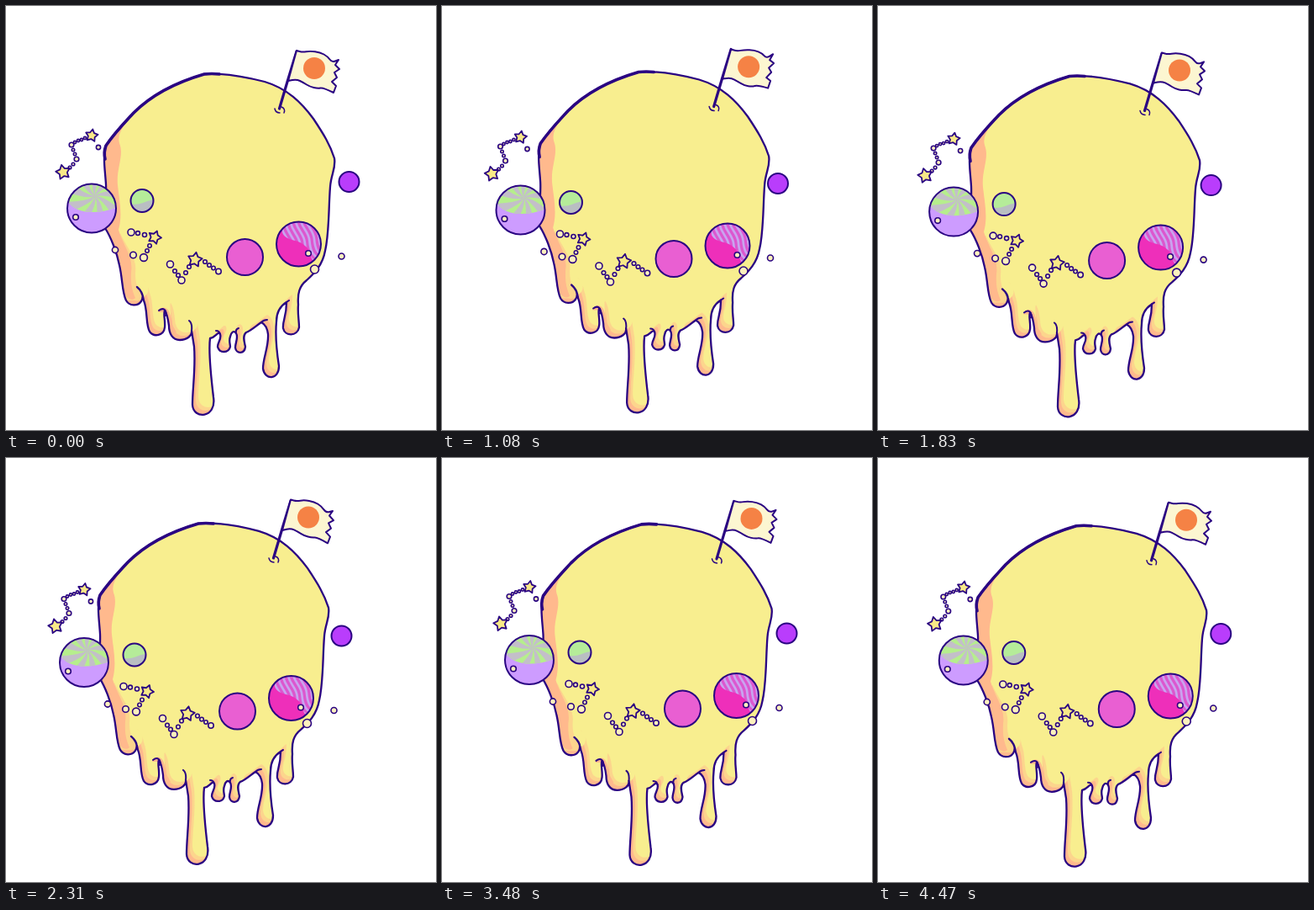
Write an HTML page that moves like this. It is 512 px wide and 504 px high and loops after 4500 ms.

```html
<!DOCTYPE html>
<html lang="en">
<head>
<meta charset="utf-8">
<title>Melting planet</title>
<style>
  html, body { margin: 0; width: 100%; height: 100%; overflow: hidden; background: #fff; }
  svg { display: block; width: 100vw; height: 100vh; }
  .ink { stroke: #2a0482; stroke-width: 2; stroke-linejoin: round; stroke-linecap: round; }
  .line { fill: none; }
</style>
</head>
<body>
<svg viewBox="0 0 512 504">
  <defs>
    <path id="shape"/>
    <clipPath id="inBody"><use href="#shape"/></clipPath>
    <clipPath id="inMint"><circle cx="102" cy="240.5" r="29"/></clipPath>
    <clipPath id="inCap"><path d="M73 231C82 247 108 249 132 239V208H72Z"/></clipPath>
    <clipPath id="inSmall"><circle cx="162" cy="231.5" r="13.5"/></clipPath>
    <clipPath id="inRose"><circle cx="348.5" cy="283" r="26.5"/></clipPath>
    <clipPath id="inStripes"><path d="M329 255V270C336 281 347 276 356 285C365 291 359 301 371 306H380V250Z"/></clipPath>
  </defs>

  <g id="body">
    <g clip-path="url(#inBody)">
      <use href="#shape" fill="#ffb98d"/>
      <use href="#shape" fill="#fcd58d" x="4" y="-5"/>
      <use href="#shape" fill="#f8ee8f" x="7" y="-9"/>
      <path fill="#fcd58d" d="M136 270C144 288 157 300 154 318C154 335 160 340 166 350H140L125 290Z"/>
      <path fill="#ffb98d" d="M156 122C146 136 131 149 135 163C141 178 131 193 133 213C135 232 139 248 134 266C139 284 152 298 149 316C148 332 151 340 154 347C150 351 146 348 143 345L105 280V160Z"/>
      <path fill="#ffb98d" d="M181 364C186 354 195 359 196 370C197 380 201 383 203 388L192 390L188 364Z"/>
    </g>
    <use href="#shape" class="ink line" style="stroke-width:2.3"/>
    <path class="ink line" style="stroke-width:3.6" d="M118 182Q116 174 119 166C130 150 140 140 152 127C175 104 205 90 236 81Q245 80 254 81"/>
    <path class="ink line" d="M334 352L337 350M304 376Q307 373 311 373M274 389Q273 384 277 383M255 390Q254 386 250 386M221 386Q222 377 218 374M190 368C192 361 187 358 182 362"/>
    <path class="ink line" style="stroke-width:1.5" d="M320 122Q321 127 326 127M328 120Q333 122 331 127"/>
    <path class="ink line" style="stroke-width:3.2" d="M325.5 122L335 90L346 54"/>
    <path id="flag" class="ink" fill="#fcf6d1"/>
    <circle id="badge" cx="367" cy="74" r="13" fill="#f58245"/>
  </g>

  <g id="orbit">
    <g clip-path="url(#inMint)">
      <circle cx="102" cy="240.5" r="29" fill="#cd9cff"/>
      <g clip-path="url(#inCap)">
        <rect x="70" y="205" width="65" height="45" fill="#b6ee8d"/>
        <path id="swirl" fill="#c3bfc9"/>
      </g>
    </g>
    <circle class="ink line" cx="102" cy="240.5" r="29"/>
    <g clip-path="url(#inSmall)">
      <circle cx="162" cy="231.5" r="13.5" fill="#b9bec2"/>
      <path fill="#b5ec99" d="M147 216H177V230Q169 231 163 234Q156 237 147 235Z"/>
    </g>
    <circle class="ink line" cx="162" cy="231.5" r="13.5"/>
    <circle class="ink" cx="284.5" cy="298.5" r="21.5" fill="#e95fd2"/>
    <g clip-path="url(#inRose)">
      <circle cx="348.5" cy="283" r="26.5" fill="#ee2fba"/>
      <g clip-path="url(#inStripes)">
        <rect x="325" y="252" width="55" height="56" fill="#dc57cf"/>
        <path id="stripes" fill="none" stroke="#c9a4ef" stroke-width="2.7"/>
      </g>
    </g>
    <circle class="ink line" cx="348.5" cy="283" r="26.5"/>
    <circle class="ink" cx="408.5" cy="209" r="12" fill="#b93dfc"/>
    <g id="dots" class="ink" fill="#fdf1bd" style="stroke-width:1.6"></g>
    <path id="stars" class="ink" fill="#f8e987" style="stroke-width:1.8"/>
  </g>
</svg>
<script>
const LOOP = 4500, STEP = 30;
const $ = id => document.getElementById(id);

const dome = `M156 334C163 340 164 346 161 351C157 357 147 357 143 350
  C138 340 139 325 135 308C132 293 125 275 118 264C115 250 120 235 119 212
  C118 195 115 180 119 166C130 150 140 140 152 127C175 104 205 90 236 81
  C260 79 285 84 308 90C335 98 352 115 366 134C378 152 386 165 391 181
  C393 193 387 200 386 215C384 240 385 270 380 291C377 308 367 318 358 326
  C349 333 347 342 348 355`;
const rightDrips = `C347 366 349 374 349 382C347 393 332 393 330 383
  C329 374 334 370 334 352C326 357 322 364 322 375C320 395 323 415 325 428
  C325 445 308 445 306 431C306 418 313 405 312 390C311 382 308 378 304 376
  C298 380 292 386 286 388C281 392 284 400 285 405C284 414 274 414 273 406
  C273 400 277 394 274 389C271 385 268 388 267 393C265 398 267 402 267 405
  C265 413 254 413 252 405C252 399 257 396 255 390C252 386 250 394 243 395`;
const leftDrips = `C241 410 244 440 247 465C251 490 223 492 222 474
  C222 455 226 430 224 405L221 386C222 392 215 397 207 397
  C198 397 194 389 194 380C193 372 192 366 189 362C187 366 190 374 189 382
  C188 392 176 394 171 387C166 378 169 362 164 350C163 343 160 337 156 334Z`;
$('shape').setAttribute('d', dome + rightDrips + leftDrips);

// Curved wedges around the hub of the mint planet
const polar = (r, a, x = 106, y = 226) => `${x + r * Math.cos(a)} ${y + r * Math.sin(a)}`;
let swirl = '';
for (let i = 0; i < 9; i++) {
  const a = i * Math.PI * 2 / 9;
  swirl += `M106 226Q${polar(10, a - .1)} ${polar(36, a + .5)}L${polar(36, a + .85)}Q${polar(12, a + .5)} 106 226Z`;
}
$('swirl').setAttribute('d', swirl);

let stripes = '';
for (let i = 0; i < 9; i++) {
  const x = 326 + i * 5.6, y = 268 - i * 2.2;
  stripes += `M${x} ${y - 14}C${x + 2} ${y + 6} ${x + 12} ${y + 7} ${x + 13} ${y + 20}S${x + 17} ${y + 36} ${x + 26} ${y + 44}`;
}
$('stripes').setAttribute('d', stripes);

const dots = [
  [94, 157, 1.6], [90, 159, 1.6], [86, 160, 1.6], [82, 162, 1.6], [78, 165, 2.8], [80, 171, 1.7],
  [82, 176, 1.7], [84, 182, 2.8], [80, 188, 1.8], [76, 192, 1.8], [110, 168, 2.6],
  [149, 269, 4], [157, 270, 2.4], [165, 272, 2.5], [171, 285, 2.2], [168, 291, 2.2],
  [164, 299, 4.4], [151.5, 296, 3.8], [130, 290, 3.6],
  [195.5, 307, 4], [201, 315, 2.3], [205, 320, 2.3], [209, 326, 4], [214, 317, 2.3], [218, 310, 2.3],
  [237, 304, 2.3], [242, 308, 2.3], [247, 311.5, 2.2], [253, 315.5, 3.2],
  [83, 251, 3.3], [360, 294, 3.3], [367.5, 313, 5], [399.5, 297.5, 3.5]
];
$('dots').innerHTML = dots.map(([x, y, r]) => `<circle cx="${x}" cy="${y}" r="${r}"/>`).join('');

const star = (x, y, r, tilt) => 'M' + Array.from({ length: 10 }, (_, i) =>
  polar(i % 2 ? r * .55 : r, tilt + i * Math.PI / 5, x, y)).join('L') + 'Z';
$('stars').setAttribute('d',
  star(102, 154, 7.6, -1.4) + star(68, 197.5, 8.8, -1.8) + star(177, 275, 8, -1.2) + star(225, 301.5, 8.8, -1.4));

// Looping cubic through [time, value] keys, flat at peaks
function track(keys) {
  const n = keys.length;
  const key = i => {
    const k = keys[(i + n) % n];
    return [k[0] + Math.floor(i / n) * LOOP, k[1]];
  };
  const rise = i => {
    const [a, p] = key(i), [b, q] = key(i + 1);
    return (q - p) / (b - a);
  };
  const slope = i => rise(i - 1) * rise(i) <= 0 ? 0 : (rise(i - 1) + rise(i)) / 2;
  return t => {
    let i = n - 1;
    while (keys[i][0] > t) i--;
    const [a, p] = key(i), [b, q] = key(i + 1);
    const d = b - a, u = (t - a) / d, s = u * u * (3 - 2 * u);
    return p + (q - p) * s + d * u * (1 - u) * ((1 - u) * slope(i) - u * slope(i + 1));
  };
}
const bodyX = track([[0, 0], [750, 1.5], [1380, -6], [1850, -8], [2310, -7], [2850, -2], [3480, 1.5], [3900, 1.2]]);
const bodyY = track([[0, 0], [540, 2], [1095, -2.5], [1635, 5], [2190, -4], [2715, 3], [3255, -4], [3795, 1], [4335, -1.2]]);
const orbitX = track([[0, 0], [270, 1.7], [540, 1], [750, -2], [1080, -8.5], [1380, -12], [1750, -12],
  [2190, -10], [2310, -9], [2700, 0], [2850, 3], [3060, 5], [3480, 2], [4330, -1.2]]);
const orbitY = track([[0, 0], [750, -1.5], [1380, 5], [2310, 2.5], [2850, 1], [3480, -.5]]);
const flutter = track([[0, 0], [750, -6], [1380, -2], [2310, 2], [2850, 6], [3480, 0]]);

const top_ = [[346, 53], [353, 55], [362, 53.5], [374, 55], [383, 60], [388, 67], [396, 64]];
const torn = [[392, 70], [397, 75], [391, 79], [394, 85], [388, 90], [393, 95], [390, 103]];
const hem = [[378, 97], [371, 98], [362, 96], [354, 91], [346, 87], [336, 89]];

// Smooth run through points by way of their midpoints
const soft = pts => pts.map(([x, y], i) => {
  const next = pts[i + 1];
  return next ? `Q${x} ${y} ${(x + next[0]) / 2} ${(y + next[1]) / 2}` : `L${x} ${y}`;
}).join('');

function drawFlag(lift) {
  const sway = x => {
    const u = (x - 336) / 60;
    return lift * (u * u - .45 * Math.sin(u * Math.PI));
  };
  const bend = pts => pts.map(([x, y]) => [x, y + sway(x)]);
  const edge = bend(top_);
  $('flag').setAttribute('d', `M${edge[0].join(' ')}` + soft(edge) +
    bend(torn).map(p => 'L' + p.join(' ')).join('') + soft(bend(hem)) + 'Z');
  $('badge').setAttribute('cy', 74 + sway(367));
}

function frame(now) {
  const t = Math.floor(now % LOOP / STEP) * STEP;
  $('body').setAttribute('transform', `translate(${bodyX(t)} ${bodyY(t)})`);
  $('orbit').setAttribute('transform', `translate(${orbitX(t)} ${orbitY(t)})`);
  drawFlag(flutter(t));
}

const start = performance.now();
function tick() {
  frame(performance.now() - start);
  requestAnimationFrame(tick);
}
tick();
</script>
</body>
</html>
```
